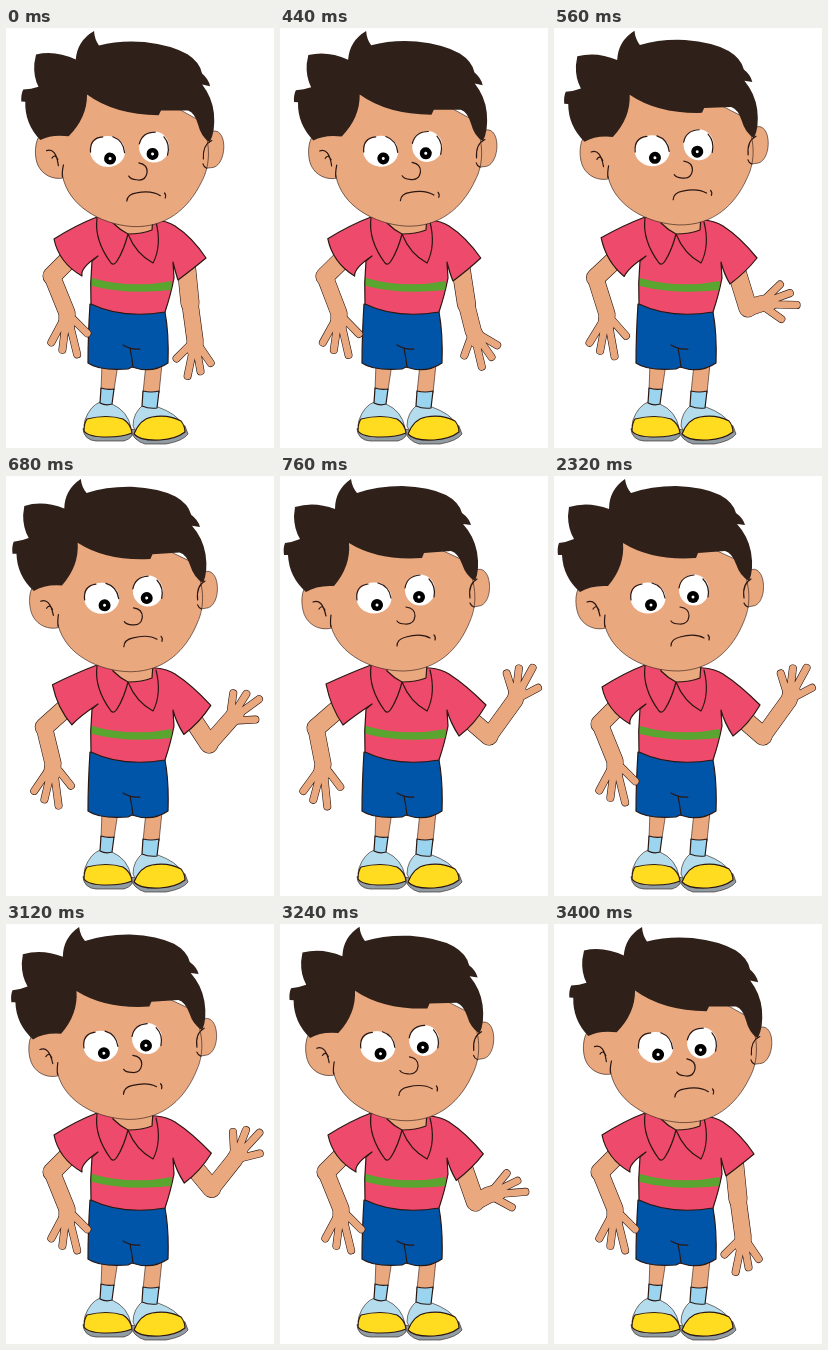
Recreate the animation shown at these times as an HTML page. Size 268x420 px, loop 4000 ms.

```html
<!DOCTYPE html>
<html lang="en">
<head>
<meta charset="utf-8">
<title>Waving boy</title>
<style>
  html, body { margin: 0; width: 100%; height: 100%; overflow: hidden; background: #fff; }
  svg { display: block; width: 100vw; height: 100vh; }
  path, ellipse { stroke-linejoin: round; stroke-linecap: round; }
  .ink { stroke: #2a1712; stroke-width: 1.2; }
  .edge { stroke: #2a1712; stroke-width: .6; }
  .line, .limb { fill: none; }
  .skin { fill: #eaa87f; }
  .hair { fill: #2f2019; }
  .shirt { fill: #ee4a6b; }
  .blue { fill: #0055a9; }
  .sock { fill: #9ad4ee; }
  .shoe { fill: #b4dcec; }
  .toe { fill: #ffdc20; }
  .sole { fill: #909da4; }
</style>
</head>
<body>
<svg viewBox="0 0 268 420" xmlns="http://www.w3.org/2000/svg">
  <!-- legs and shoes -->
  <g class="edge">
    <path class="skin" d="M96 336L95 362H108L112 336Z"/>
    <path class="skin" d="M140 336L137 365H153L156 336Z"/>
    <path class="sole" d="M77 401Q78 412 90 413H118Q128 410 127 402Z"/>
    <path class="shoe" d="M94 374Q84 378 79 392L78 398L125 400Q122 383 106 376Z"/>
    <path class="sole" d="M124 402Q128 413 139 416H160Q177 413 182 406L179 398Z"/>
    <path class="shoe" d="M137 377Q127 385 127 398L130 404L176 396Q171 386 152 379Z"/>
  </g>
  <g class="ink">
    <path class="sock" d="M95 360Q101 362 108 361L106 376Q100 378 94 375Z"/>
    <path class="sock" d="M137 363Q145 365 153 363L151 380Q143 381 136 378Z"/>
    <path class="toe" d="M78 403Q78 395 81 391Q101 386 117 391Q125 396 126 405Q117 409 101 409Q82 409 78 403Z"/>
    <path class="toe" d="M128 406Q134 391 146 389Q162 386 175 393Q179 398 179 404Q170 411 154 412Q134 413 128 406Z"/>
    <path class="blue" d="M84 276Q82 308 82 335Q93 343 122 341L126 339Q146 346 162 335Q163 305 159 284Z"/>
    <path class="line" d="M124 320Q126 330 127 339M117 317Q125 322 134 321"/>
  </g>

  <g id="arms"></g>

  <!-- shirt -->
  <path id="shirt" class="shirt ink"/>
  <path fill="#5aa52f" d="M86 250Q124 261 166 253L165 262Q122 267 86 258Z"/>
  <path class="skin ink" d="M107 188V195Q114 202 122 206Q136 206 146 202L147 188Z"/>
  <path class="line ink" d="M91 190Q88 212 105 235Q108 238 111 233Q118 222 122 206Q130 226 147 235Q156 218 150 194"/>

  <!-- head, drawn as tilted while waving -->
  <g id="head">
    <g class="edge">
      <path class="skin" d="M54 105L26 110C20 117 21 134 26 142C31 150 41 155 52 152Z"/>
      <path class="skin" d="M191 102C194 91 204 90 208 101C212 113 208 129 199 130L188 132Z"/>
      <path class="skin" d="M50 105L51 150C59 179 92 195 124 195C158 194 179 173 190 145C198 127 196 105 185 85L120 55L65 65Z"/>
    </g>
    <path class="skin" d="M44 108H55L56 148L47 150Z"/>
    <path class="line ink" d="M33 126Q42 122 46 140M39 133Q42 128 45 134M51 139Q50 147 51 151M197 103Q188 108 190 122M194 131Q191 130 190 127"/>
    <path class="hair" d="M4 79Q3 72 5 67Q13 66 20 63Q14 53 14 40L15 31Q34 25 55 33Q55 14 71 3Q72 11 77 17Q97 10 122 10Q150 11 166 19Q179 26 182 37Q189 42 191 49L183 48Q194 60 197 76Q200 94 195 105Q186 100 182 88Q178 77 171 75L144 77L142 82Q98 85 69 67Q71 90 54 110Q37 109 26 116Q9 101 8 79Z"/>
    <g class="ink">
      <ellipse cx="94" cy="122" rx="17.5" ry="15.5" fill="#fff" stroke="none"/>
      <ellipse cx="140" cy="114" rx="15" ry="15.5" fill="#fff" stroke="none"/>
      <path class="line" d="M77 124Q75 110 88 108M98 107Q109 110 111 122M125 112Q127 100 140 99M149 103Q156 110 154 121"/>
    </g>
    <circle cx="97" cy="129" r="6"/>
    <circle cx="139" cy="121" r="6"/>
    <circle cx="97" cy="129" r="1.5" fill="#fff"/>
    <circle cx="139" cy="121" r="1.5" fill="#fff"/>
    <path class="line ink" d="M126 131Q135 132 135 140Q134 149 125 148Q119 148 117 145M117 170Q117 163 126 161Q141 157 150 162M154 159Q156 161 155 164"/>
  </g>
</svg>
<script>
const LOOP = 4000, STEP = 40, TILT = 4.5;
const SKIN = '#eaa87f', INK = '#2a1712';

// shoulder, elbow, wrist, hand angle, sleeve corners
const RIGHT = [
  { at: 0,     v: [180, 235, 184, 275, 189, 312, 0,    200, 230, 172, 252] },
  { at: 4 / 9, v: [181, 238, 194, 280, 206, 276, -100, 203, 230, 176, 256] },
  { at: 1,     v: [186, 240, 209, 260, 235, 224, -163, 206, 229, 179, 260] }
];
const LEFT = [
  { at: 0, v: [72, 222, 46, 248, 61, 285, 0, 48, 211, 76, 248] },
  { at: 1, v: [66, 226, 36, 252, 43, 288, 8, 46, 208, 63, 249] }
];
const RIGHT_TIPS = [[-20, 20], [-8, 39], [6, 34], [17, 25]];
const LEFT_TIPS = [[-17, 32], [-5, 40], [11, 45], [22, 22]];

const byId = id => document.getElementById(id);

function makeArm() {
  const widths = [19, 17, 8];
  return [[INK, 0], [SKIN, 1.2]].map(([color, inset]) => widths.map(w => {
    const p = document.createElementNS('http://www.w3.org/2000/svg', 'path');
    p.setAttribute('class', 'limb');
    p.setAttribute('stroke', color);
    p.setAttribute('stroke-width', w - inset);
    byId('arms').append(p);
    return p;
  }));
}

// progress of a move that advances once every STEP ms
function stepped(t, start, count) {
  const n = Math.floor((t - start) / STEP) + 1;
  return Math.max(0, Math.min(count, n)) / count;
}

function pose(keys, p) {
  let i = 1;
  while (i < keys.length - 1 && p > keys[i].at) i++;
  const a = keys[i - 1], b = keys[i];
  const k = (p - a.at) / (b.at - a.at);
  return a.v.map((n, j) => n + (b.v[j] - n) * k);
}

function drawArm(arm, [sx, sy, ex, ey, wx, wy, deg], tips) {
  const r = deg * Math.PI / 180, c = Math.cos(r), s = Math.sin(r);
  const spot = (x, y) => `${wx + x * c - y * s} ${wy + x * s + y * c}`;
  const paths = [
    `M${sx} ${sy}L${ex} ${ey}`,
    `M${ex} ${ey}L${wx} ${wy}L${spot(0, 10)}`,
    tips.map(([x, y]) => `M${spot(x * .3, y * .3)}L${spot(x * .92, y * .92)}`).join('')
  ];
  for (const layer of arm) layer.forEach((el, i) => el.setAttribute('d', paths[i]));
}

function drawShirt(l, r) {
  const [lx, ly, lx2, ly2] = l.slice(7), [rx, ry, rx2, ry2] = r.slice(7);
  byId('shirt').setAttribute('d',
    `M91 189Q70 197 ${lx} ${ly}Q${lx + 5} ${ly + 24} ${lx2} ${ly2}Q74 240 92 228L86 233` +
    `Q84 255 85 276Q116 291 159 284Q165 266 168 250L167 234` +
    `Q170 246 ${rx2} ${ry2}Q${rx2 + 16} ${ry2 - 12} ${rx} ${ry}Q186 209 169 198Q161 193 150 192Z`);
}

const leftArm = makeArm(), rightArm = makeArm();

function draw(now) {
  const t = now % LOOP;
  const rise = stepped(t, 440, 9);
  const lift = rise - stepped(t, 3120, 8);
  const swing = rise - stepped(t, 1960, 10);
  const left = pose(LEFT, swing), right = pose(RIGHT, lift);
  drawArm(leftArm, left, LEFT_TIPS);
  drawArm(rightArm, right, RIGHT_TIPS);
  drawShirt(left, right);
  byId('head').setAttribute('transform', `rotate(${TILT * (1 - lift)} 80 220)`);
}

const start = performance.now();
function tick() {
  draw(performance.now() - start);
  requestAnimationFrame(tick);
}
tick();
</script>
</body>
</html>
```
